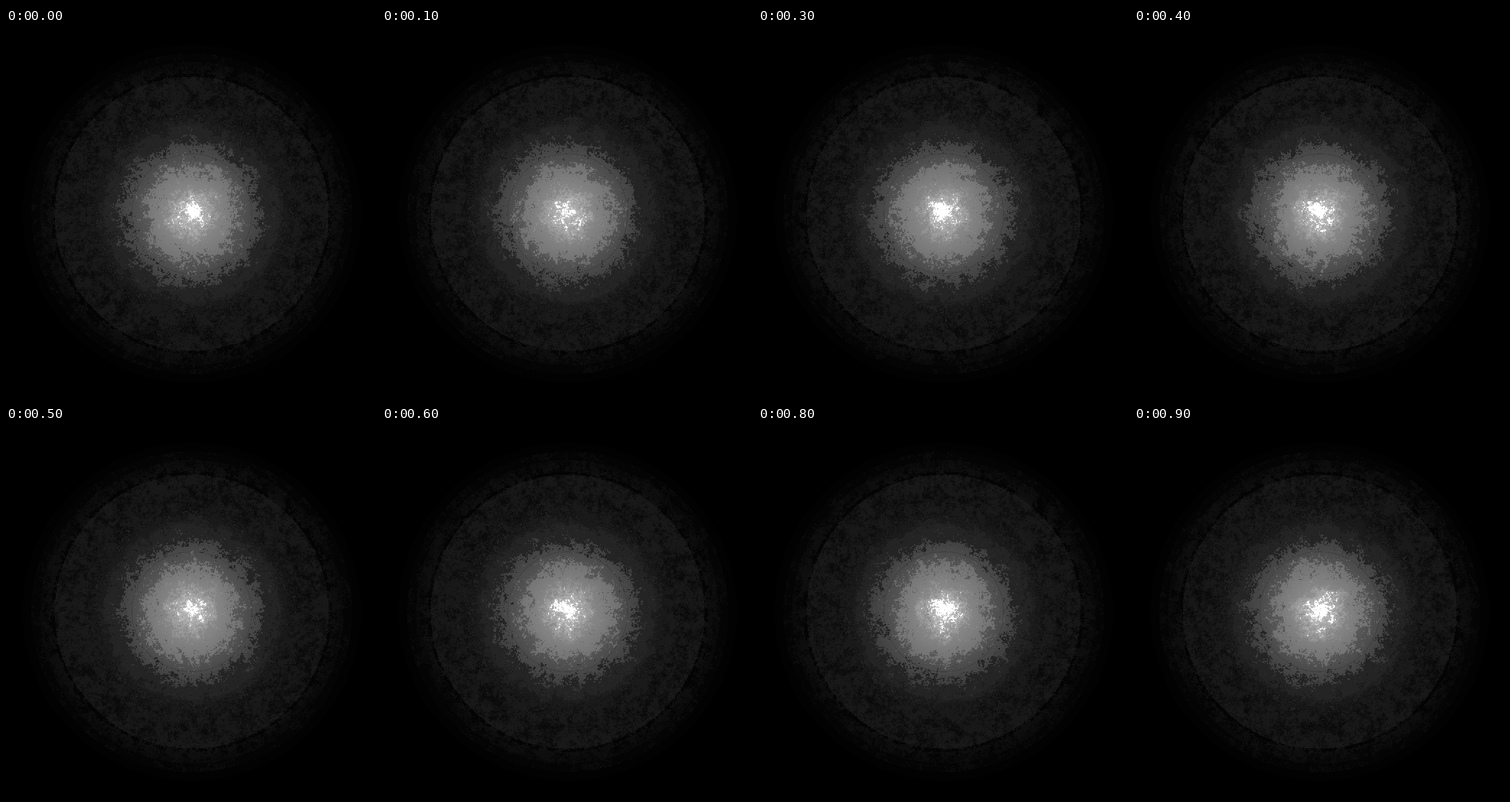
These frames come from a looping animation (512x512 px, 1000 ms). An HTML page with a canvas:

```html
<!DOCTYPE html>
<html lang="en">
<head>
<meta charset="utf-8">
<title>Grainy glow</title>
<style>
html, body { margin: 0; width: 100%; height: 100%; overflow: hidden; background: #000; }
canvas { display: block; width: 100%; height: 100%; image-rendering: pixelated; }
</style>
</head>
<body>
<canvas id="stage" width="512" height="512"></canvas>
<script>
const SIZE = 512, CENTER = 256.5, STEPS = 10, STEP_MS = 100;
const ctx = document.getElementById('stage').getContext('2d');

function random(seed) {
  let s = seed >>> 0;
  return () => {
    s = (s + 0x6D2B79F5) | 0;
    let t = Math.imul(s ^ (s >>> 15), 1 | s);
    t = (t + Math.imul(t ^ (t >>> 7), 61 | t)) ^ t;
    return ((t ^ (t >>> 14)) >>> 0) / 4294967296;
  };
}

// Adds one octave of interpolated lattice noise to the field.
function addOctave(field, cell, weight, rand) {
  const n = Math.ceil(SIZE / cell) + 2;
  const grid = Float32Array.from({ length: n * n }, () => rand() * 2 - 1);
  for (let y = 0; y < SIZE; y++) {
    const gy = Math.floor(y / cell), fy = y / cell - gy;
    for (let x = 0; x < SIZE; x++) {
      const gx = Math.floor(x / cell), fx = x / cell - gx, i = gy * n + gx;
      const top = grid[i] + (grid[i + 1] - grid[i]) * fx;
      const low = grid[i + n] + (grid[i + n + 1] - grid[i + n]) * fx;
      field[y * SIZE + x] += weight * (top + (low - top) * fy);
    }
  }
}

function noise(seed) {
  const field = new Float32Array(SIZE * SIZE), rand = random(seed);
  addOctave(field, 1, 0.7, rand);
  addOctave(field, 2, 1.2, rand);
  addOctave(field, 5, 1.2, rand);
  addOctave(field, 13, 1.1, rand);
  return field;
}

// Grey level at radius r, with n as the local roughness.
function shade(r, n) {
  if (r > 234) return 0;
  if (r > 222) return 2;
  if (r > 210) return n > 0.9 ? 10 : 4;
  if (r > 194) return n > (r - 198) / 10 ? 14 : n > -0.9 ? 9 : 4;
  if (r > 189.5) return n > 0.4 ? 16 : 4;

  const edge = r + n * Math.min(9, 7 + r * 0.05);
  if (edge < 12) return 255;
  if (edge < 22) return 200 - r;
  if (edge < 35) return 180 - 0.9 * r;
  const line = Math.abs(r - 83) < 0.6 ? 9 : 0;
  if (edge < 65) return 155 - 0.6 * r;
  if (edge < 97) return 124 - 0.6 * r - line;
  if (edge < 125) return r < 122 ? 36 : 32;
  const base = r < 155 ? 26 : 24;
  return n > 0.2 ? base : n > -1 ? base - 7 : base - 14;
}

const still = noise(17);

function render(step) {
  const image = ctx.createImageData(SIZE, SIZE);
  const moving = noise(101 + step * 37);
  for (let y = 0, i = 0; y < SIZE; y++) {
    for (let x = 0; x < SIZE; x++, i++) {
      const r = Math.hypot(x - CENTER, y - CENTER);
      const n = still[i] * 0.6 + moving[i] * 0.8;
      const v = shade(r, n), p = i * 4;
      image.data[p] = image.data[p + 1] = image.data[p + 2] = v;
      image.data[p + 3] = 255;
    }
  }
  return image;
}

const frames = Array.from({ length: STEPS }, (_, step) => render(step));
const start = performance.now();
let shown = -1;

function draw() {
  const step = Math.floor((performance.now() - start) / STEP_MS) % STEPS;
  if (step !== shown) ctx.putImageData(frames[shown = step], 0, 0);
  requestAnimationFrame(draw);
}
draw();
</script>
</body>
</html>
```
